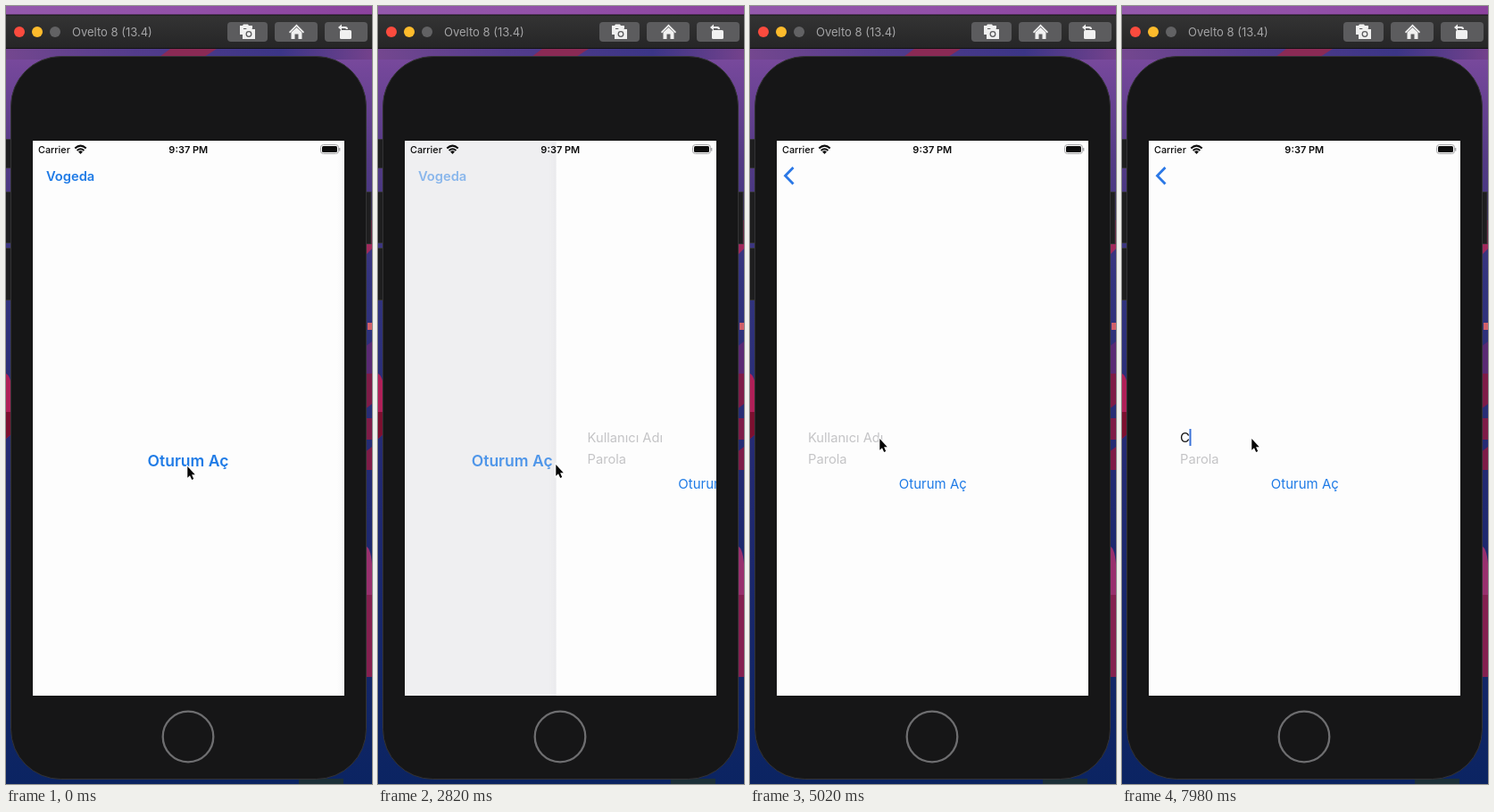
Animation of 410x872 px, one loop 8 s. Source, as an HTML page:

```html
<!DOCTYPE html>
<html lang="tr">
<head>
<meta charset="utf-8">
<title>Oturum Aç</title>
<style>
  @property --p { syntax: "<number>"; inherits: true; initial-value: 0; }

  html, body { margin: 0; width: 100%; height: 100%; overflow: hidden; background: #20286c; }
  svg { display: block; width: 100%; height: 100%; font-family: Inter, Roboto, sans-serif;
        animation: push 8s linear infinite; }

  .bold { font-weight: 600; fill: #1f7be6; }
  .hint { font-size: 14.7px; fill: #c4c4c6; }
  .page-old { transform: translateX(calc(var(--p) * -104.7px)); }
  .page-new { transform: translateX(calc((1 - var(--p)) * 349px)); }
  .dim { opacity: var(--p); }
  .brand { opacity: calc(1 - var(--p)); }
  .press { animation: press 8s linear infinite; }
  .back { animation: back 8s linear infinite; }
  .pointer { animation: pointer 8s linear infinite; }
  .caret { animation: caret 8s step-end infinite; }
  .empty { animation: empty 8s step-end infinite; }
  .typed { animation: typed 8s step-end infinite; }

  /* critically damped spring: 1 - (1 + x)e^-x */
  @keyframes push {
    0%, 32.25% { --p: 0; }
    33.12% { --p: .09; }
    33.98% { --p: .264; }
    34.85% { --p: .442; }
    35.72% { --p: .594; }
    36.58% { --p: .713; }
    37.46% { --p: .801; }
    39.19% { --p: .908; }
    40.93% { --p: .96; }
    42.66% { --p: .983; }
    46.13% { --p: .997; }
    51%, 100% { --p: 1; }
  }
  @keyframes press {
    0%, 31% { opacity: 1; }
    31.5% { opacity: .45; }
    33.25% { opacity: .5; }
    37%, 100% { opacity: 1; }
  }
  @keyframes back {
    0%, 39% { opacity: 0; }
    43%, 100% { opacity: 1; }
  }
  @keyframes pointer {
    0%, 9% { transform: translate(203px, 515px); animation-timing-function: ease-in-out; }
    16%, 18% { transform: translate(185px, 513px); animation-timing-function: ease-in-out; }
    25%, 43% { transform: translate(199px, 513px); animation-timing-function: ease-in; }
    49.25% { transform: translate(171px, 505px); animation-timing-function: ease-out; }
    55%, 100% { transform: translate(145px, 484px); }
  }
  @keyframes caret {
    0% { opacity: 0; transform: none; }
    63%, 75.5%, 88% { opacity: 1; transform: none; }
    69.25%, 81.75%, 94.25% { opacity: 0; transform: none; }
    95%, 100% { opacity: 1; transform: translateX(10.5px); }
  }
  @keyframes empty { 0% { opacity: 1; } 95%, 100% { opacity: 0; } }
  @keyframes typed { 0% { opacity: 0; } 95%, 100% { opacity: 1; } }
</style>
</head>
<body>
<svg viewBox="0 0 410 872" preserveAspectRatio="none">
  <defs>
    <linearGradient id="sky" x2="0" y2="1">
      <stop offset="0" stop-color="#8f56a4"/>
      <stop offset=".08" stop-color="#74479a"/>
      <stop offset=".2" stop-color="#533a84"/>
      <stop offset=".35" stop-color="#33347e"/>
      <stop offset=".6" stop-color="#232a72"/>
      <stop offset="1" stop-color="#0b2462"/>
    </linearGradient>
    <linearGradient id="top">
      <stop offset="0" stop-color="#9459ac"/>
      <stop offset=".5" stop-color="#9250a8"/>
      <stop offset="1" stop-color="#8c429e"/>
    </linearGradient>
    <linearGradient id="under">
      <stop offset="0" stop-color="#74478f"/>
      <stop offset=".35" stop-color="#533c8c"/>
      <stop offset=".75" stop-color="#3b3586"/>
      <stop offset="1" stop-color="#74428c"/>
    </linearGradient>
    <linearGradient id="bar" x2="0" y2="1">
      <stop offset="0" stop-color="#343434"/>
      <stop offset="1" stop-color="#252526"/>
    </linearGradient>
    <linearGradient id="edge">
      <stop offset="0" stop-color="#e2e2e6" stop-opacity="0"/>
      <stop offset="1" stop-color="#dedee4"/>
    </linearGradient>
    <clipPath id="screen"><rect x="30" y="151" width="349" height="622"/></clipPath>
  </defs>

  <!-- wallpaper -->
  <rect width="410" height="872" fill="url(#sky)"/>
  <rect width="410" height="10" fill="url(#top)"/>
  <rect y="48" width="410" height="12" fill="url(#under)"/>
  <path d="M172 57L184 48H236L222 57Z" fill="#8a2a55"/>
  <path d="M0 412Q6 414 8 440V478L0 485Z" fill="#b02058"/>
  <path d="M0 455H8V478L0 485Z" fill="#7c1030"/>
  <path d="M400 240H410V272L400 282Z" fill="#a02a5c"/>
  <path d="M405 355H410V363H405Z" fill="#d0606a"/>
  <path d="M402 382L410 376V412H402Z" fill="#5a2a74"/>
  <path d="M402 412H410V446L402 452ZM402 462H410V486H402ZM402 500L410 494V520H402Z" fill="#7e1c48"/>
  <path d="M400 606Q408 602 410 625V752H400Z" fill="#98306e"/>
  <path d="M402 660H410V752H402Z" fill="#842050"/>
  <rect x="328" y="866" width="50" height="6" fill="#1c3038"/>

  <!-- window bar -->
  <rect y="10" width="410" height="38" fill="url(#bar)"/>
  <path d="M0 10H410M0 47.5H410" stroke="#121213"/>
  <circle cx="15" cy="29" r="6" fill="#fb4b3e"/>
  <circle cx="35" cy="29" r="6" fill="#fdbb2c"/>
  <circle cx="55" cy="29" r="6" fill="#626264"/>
  <text x="74" y="34" font-size="13" fill="#a4a4a6">Ovelto 8 (13.4)</text>
  <g fill="#5c5c5e">
    <rect x="248" y="18" width="45" height="22" rx="4"/>
    <rect x="301" y="18" width="48" height="22" rx="4"/>
    <rect x="357" y="18" width="48" height="22" rx="4"/>
  </g>
  <g fill="#f0f0f0">
    <path d="M262 22H265L266 20.5H271L272 22H276V25H266V32H262Z"/>
    <path d="M265 26H269L270 24.5H275L276 26H279V37H265Z"/>
    <path d="M317 29L325.5 20.5L334 29L333 30.5L325.5 23L318 30.5Z"/>
    <path d="M319.5 29.5L325.5 24L331.5 29.5V37H327.5V31.5H323.5V37H319.5Z"/>
    <rect x="374" y="27" width="13" height="10" rx="1.5"/>
    <path d="M372 24L376 20.5V23H380Q383 23 383 26H381Q381 25 379 25H376V27.5Z"/>
  </g>
  <circle cx="272" cy="31.5" r="2.8" fill="none" stroke="#5c5c5e" stroke-width="1.3"/>

  <!-- device -->
  <g fill="#1e1e1f" stroke="#343436">
    <rect x="-3" y="149.5" width="12" height="32"/>
    <rect x="-3" y="208.5" width="12" height="57"/>
    <rect x="-3" y="271.5" width="12" height="58"/>
    <rect x="400" y="208.5" width="9" height="58"/>
  </g>
  <rect x="5.5" y="56.5" width="398" height="810" rx="56" fill="#161617" stroke="#333335"/>
  <circle cx="204" cy="819" r="28.3" fill="none" stroke="#6e6e70" stroke-width="2.3"/>

  <!-- pages -->
  <g clip-path="url(#screen)">
    <rect x="30" y="151" width="349" height="622" fill="#fdfdfd"/>
    <rect class="dim" x="30" y="151" width="349" height="622" fill="#e2e2e6"/>
    <g class="page-old">
      <text class="bold press" x="204" y="516" font-size="17.5" text-anchor="middle">Oturum Aç</text>
    </g>
    <g class="page-new">
      <rect x="22" y="151" width="8" height="622" fill="url(#edge)" opacity=".3"/>
      <rect x="30" y="151" width="349" height="622" fill="#fdfdfd"/>
      <text class="hint empty" x="65" y="489">Kullanıcı Adı</text>
      <text class="typed" x="65" y="489" font-size="15" fill="#111">C</text>
      <text class="hint" x="65" y="513">Parola</text>
      <text x="204.8" y="541" font-size="15" text-anchor="middle" fill="#1f7be6">Oturum Aç</text>
      <rect class="caret" x="65" y="474" width="2" height="19" fill="#3a72d8"/>
    </g>
  </g>

  <!-- navigation and status bars -->
  <text class="bold brand" x="45" y="196" font-size="14.7">Vogeda</text>
  <path class="back" d="M48.5 181L39.5 190.2L48.5 199.5" fill="none" stroke="#2b78e6" stroke-width="2.8"/>
  <g fill="#0c0c0c">
    <text x="36" y="164.5" font-size="10.8" font-weight="500">Carrier</text>
    <text x="204.3" y="164.5" font-size="11" font-weight="600" text-anchor="middle">9:37 PM</text>
    <path d="M83.5 166L81 163.3Q83.5 161.3 86 163.3Z"/>
    <rect x="354" y="157" width="17" height="7" rx="1.5"/>
  </g>
  <g fill="none" stroke="#0c0c0c" stroke-width="2">
    <path d="M77.3 159.5Q83.5 153.8 89.7 159.5"/>
    <path d="M79.6 162Q83.5 158.4 87.4 162"/>
  </g>
  <rect x="352.5" y="155.5" width="20" height="10" rx="3" fill="none" stroke="#a4a4a6"/>
  <path d="M373.7 159V162.5" stroke="#a4a4a6" stroke-width="1.3"/>

  <path class="pointer" d="M.3 1V13.8L3 11.2L5.2 16L7.2 15.1L5.1 10.3H8.8Z"
        fill="#060606" stroke="#fff" stroke-width="2" paint-order="stroke"/>
</svg>
</body>
</html>
```
